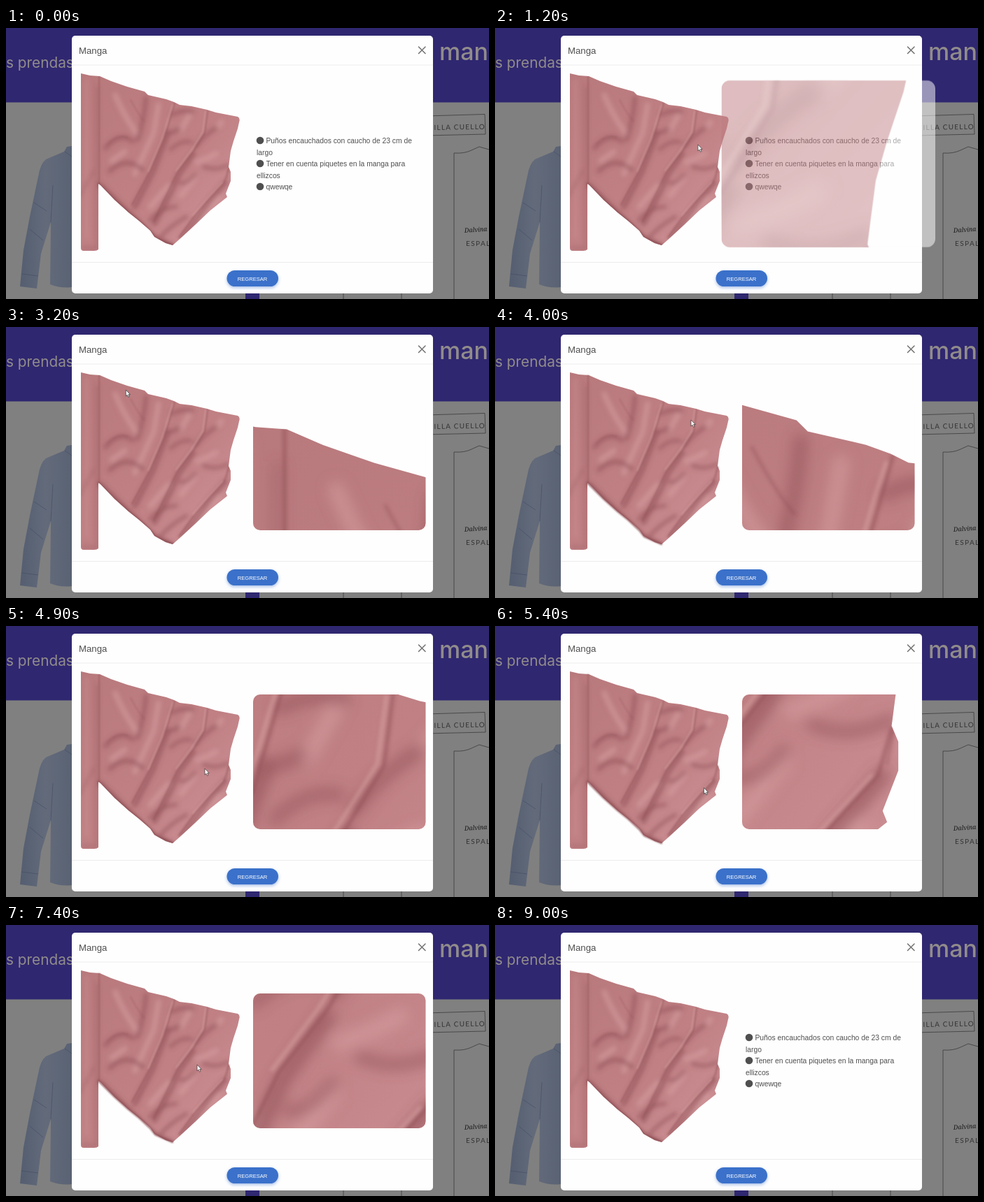
An HTML page for the animation above (9200 ms loop, 690x388 px).

```html
<!DOCTYPE html>
<html lang="es">
<head>
<meta charset="utf-8">
<title>Manga</title>
<style>
  html, body { margin: 0; width: 100%; height: 100%; overflow: hidden; background: #808080; }
  svg { display: block; width: 690px; height: 388px; font-family: "Liberation Sans", Arial, sans-serif; }
  .head { font-family: Inter, sans-serif; fill: #918c8b; }
  .line { fill: none; stroke: #3c3c3c; stroke-width: .8; }
  .label { font: 10px Lato, sans-serif; fill: #333; }
  .dark, .light { fill: none; stroke-linecap: round; stroke-linejoin: round; }
  .dark { stroke: #8c4d53; }
  .light { stroke: #d9a3a4; }
</style>
</head>
<body>
<svg viewBox="0 0 690 388">
  <defs>
    <linearGradient id="cloth" x1="0" y1="0" x2="1" y2="1">
      <stop offset="0" stop-color="#b8797c"/>
      <stop offset=".55" stop-color="#c08084"/>
      <stop offset="1" stop-color="#d0959a"/>
    </linearGradient>
    <linearGradient id="denim">
      <stop offset="0" stop-color="#545e70"/>
      <stop offset=".5" stop-color="#636b7b"/>
      <stop offset="1" stop-color="#596273"/>
    </linearGradient>
    <filter id="soft" filterUnits="userSpaceOnUse" x="90" y="50" width="260" height="285"><feGaussianBlur stdDeviation="3"/></filter>
    <filter id="fine" filterUnits="userSpaceOnUse" x="90" y="50" width="260" height="285"><feGaussianBlur stdDeviation=".8"/></filter>
    <filter id="drop" x="-20%" y="-30%" width="140%" height="190%"><feDropShadow dx="0" dy="2" stdDeviation="2" flood-color="#3b71ca" flood-opacity=".45"/></filter>
    <path id="outline" d="M107 65L120 68L134 69L150 76L173 84L198 91L203 96L229 102L240 106L248 110L265 112L287 117L300 121L331 127Q335 129 333 135L331 144L325 162L321 176L318 199L321 206L321 219L314 237L316 242L292 261L270 282L245 305L238 311L228 308L212 299L206 290L190 276L175 264L155 246L135 225L132 223L132 317Q130 319 126 319L111 319Q107 319 107 315Z"/>
    <clipPath id="sleeve"><use href="#outline"/></clipPath>
    <clipPath id="window"><rect x="353" y="98" width="246.5" height="193" rx="10"/></clipPath>

    <g id="photo">
      <use href="#outline" fill="url(#cloth)"/>
      <g clip-path="url(#sleeve)">
        <g filter="url(#soft)">
          <path class="light" stroke-width="7" opacity=".55" d="M156 96Q168 125 186 150M218 110L211 150L184 209M262 125L250 146M273 192Q290 186 300 180M232 226L206 256M308 135L302 142M304 244L270 276M151 190L170 177M250 240L270 215"/>
          <path class="light" stroke-width="5" opacity=".3" d="M115 75V300"/>
          <path class="dark" stroke-width="7" opacity=".6" d="M231 152L209 208L184 256M268 180L248 208L230 246L212 280M314 221L291 248L252 300"/>
          <path class="dark" stroke-width="6" opacity=".55" d="M200 100Q198 130 188 160M230 149Q238 151 247 145M238 124Q250 117 266 120M271 170Q282 154 300 143M142 172Q162 148 181 162M148 205Q172 182 195 203"/>
          <path class="dark" stroke-width="5" opacity=".55" d="M235 174Q250 160 264 163M318 196Q298 206 282 198M205 275Q224 256 243 256M222 298Q234 284 258 270M270 210Q258 225 250 222"/>
          <path class="dark" stroke-width="4" opacity=".35" d="M130 85V318M107 240L124 205M109 315H130"/>
          <path class="dark" stroke-width="6" opacity=".8" d="M134 225L175 265L212 300L238 312"/>
        </g>
        <g filter="url(#fine)">
          <path class="light" stroke-width="1.6" opacity=".6" d="M238 110L233 125L228 142L222 160L203 205M285 119L281 149L264 176L243 204M309 221L286 246L267 268"/>
          <path class="dark" stroke-width="1.6" opacity=".55" d="M133 69V223M241 107L236 125L231 142L226 160L206 205L180 253M288 118L284 150L267 178L246 205L226 246L211 277M318 200L312 221L289 246L270 268L247 300"/>
          <path class="dark" stroke-width="1" opacity=".5" d="M145 166Q161 151 174 157M178 103Q188 122 197 133M319 201L316 216"/>
          <path class="dark" stroke-width="2" d="M132 223L155 246L175 264L190 276L206 291L213 300L238 311"/>
        </g>
      </g>
    </g>
  </defs>

  <!-- Dimmed page -->
  <rect width="690" height="388" fill="#808080"/>
  <rect width="690" height="106.5" fill="#2f2770"/>
  <text class="head" x="0" y="57" font-size="20.8">s prendas</text>
  <text class="head" x="619" y="46" font-size="34" font-weight="500">mangas</text>
  <path fill="url(#denim)" d="M94 169L87 170L83 177L57 188Q49 194 46 213L34 270L25 318L20 370L44 373L50 323L64 278L63 367Q78 373 94 371Z"/>
  <path fill="none" stroke="#465067" stroke-width="1" opacity=".7" d="M64 278L67 225M22 352L46 355M84 177L94 184M40 250L58 262M34 288L53 304"/>
  <path d="M342 376h20v12h-20z" fill="#2f2770"/>
  <path class="line" d="M482 376v12M565 376v12M600 126L684 123.500L685 152L600 154M640 388V179Q655 180 665 175L676 170L690 174"/>
  <text class="label" x="611.5" y="146" letter-spacing="1.25" transform="rotate(-1 611.5 146)">ILLA CUELLO</text>
  <text x="655" y="293" font-family="'Noto Serif', serif" font-style="italic" font-size="9" fill="#191919" transform="rotate(-4 655 293)">Dalvina T</text>
  <text class="label" x="657" y="312" font-size="9" letter-spacing="1.4">ESPALDA</text>

  <!-- Dialog -->
  <rect x="94" y="11" width="516" height="369" rx="5" fill="#fefefe"/>
  <path d="M94 53H610M94 335.500H610" stroke="#e7e7e7" stroke-width=".8"/>
  <text x="104" y="36.500" font-size="13.200" fill="#4f4f4f">Manga</text>
  <path d="M589.500 27l9.500 9.500m0-9.500l-9.500 9.500" stroke="#717171" stroke-width="1.5" stroke-linecap="round"/>
  <rect x="315.500" y="347" width="73.500" height="23" rx="11.500" fill="#3b71ca" filter="url(#drop)"/>
  <text x="352" y="361.500" font-size="7.600" fill="#fff" text-anchor="middle">REGRESAR</text>
  <use href="#photo"/>
  <g font-size="10.300" fill="#4f4f4f">
    <text x="371.500" y="165">Puños encauchados con caucho de 23 cm de</text>
    <text x="358" y="181.500">largo</text>
    <text x="371.500" y="198">Tener en cuenta piquetes en la manga para</text>
    <text x="358" y="214.500">ellizcos</text>
    <text x="371.500" y="231">qwewqe</text>
    <circle cx="363" cy="161" r="5.300"/><circle cx="363" cy="194" r="5.300"/><circle cx="363" cy="227" r="5.300"/>
  </g>

  <g id="panel">
    <g clip-path="url(#window)">
      <rect x="353" y="98" width="247" height="193" fill="#fefefe"/>
      <g id="lens"><use href="#photo"/></g>
    </g>
  </g>
  <path id="cursor" d="M0 0V9L2 7.200L3.500 10.300L5 9.600L3.600 6.600H6.200Z" fill="#fff" stroke="#333" stroke-width=".7"/>
</svg>
<script>
  const LOOP = 9200, ZOOM = 3.2, LAG = 300, CX = 476.25, CY = 194.5;
  const [panel, lens, cursor] = ["panel", "lens", "cursor"].map(id => document.getElementById(id));
  const clamp = v => Math.max(0, Math.min(1, v));

  // time, pointer x, y
  const path = [
    [500, 345, 372], [900, 304, 170], [1200, 290, 167], [1900, 226, 132],
    [2200, 138, 77], [3100, 163, 86], [3700, 212, 110], [4000, 280, 133],
    [4600, 264, 148], [4900, 284, 204], [5700, 307, 248], [6200, 307, 248],
    [7100, 273, 200]
  ];

  function pointer(t) {
    let i = 1;
    while (i < path.length - 1 && path[i][0] < t) i++;
    const [t0, x0, y0] = path[i - 1], [t1, x1, y1] = path[i];
    const p = clamp((t - t0) / (t1 - t0));
    return [x0 + (x1 - x0) * p, y0 + (y1 - y0) * p];
  }

  function draw(now) {
    const t = now % LOOP;
    const [x, y] = pointer(t), [lx, ly] = pointer(t - LAG); // the magnified view trails the pointer
    const enter = clamp((t - 930) / 520), leave = clamp((t - 7650) / 350);
    const scale = 1 + .5 * (1 - enter) + .1 * leave;
    panel.setAttribute("opacity", enter * (1 - leave));
    panel.setAttribute("transform", `translate(${CX} ${CY}) scale(${scale}) translate(${-CX} ${-CY})`);
    lens.setAttribute("transform", `translate(${CX} ${CY}) scale(${ZOOM}) translate(${-lx} ${-ly})`);
    cursor.setAttribute("transform", `translate(${x} ${y})`);
    cursor.setAttribute("visibility", t >= 500 && t < 7700 ? "visible" : "hidden");
    requestAnimationFrame(() => draw(performance.now() - start));
  }
  const start = performance.now();
  draw(0);
</script>
</body>
</html>
```
